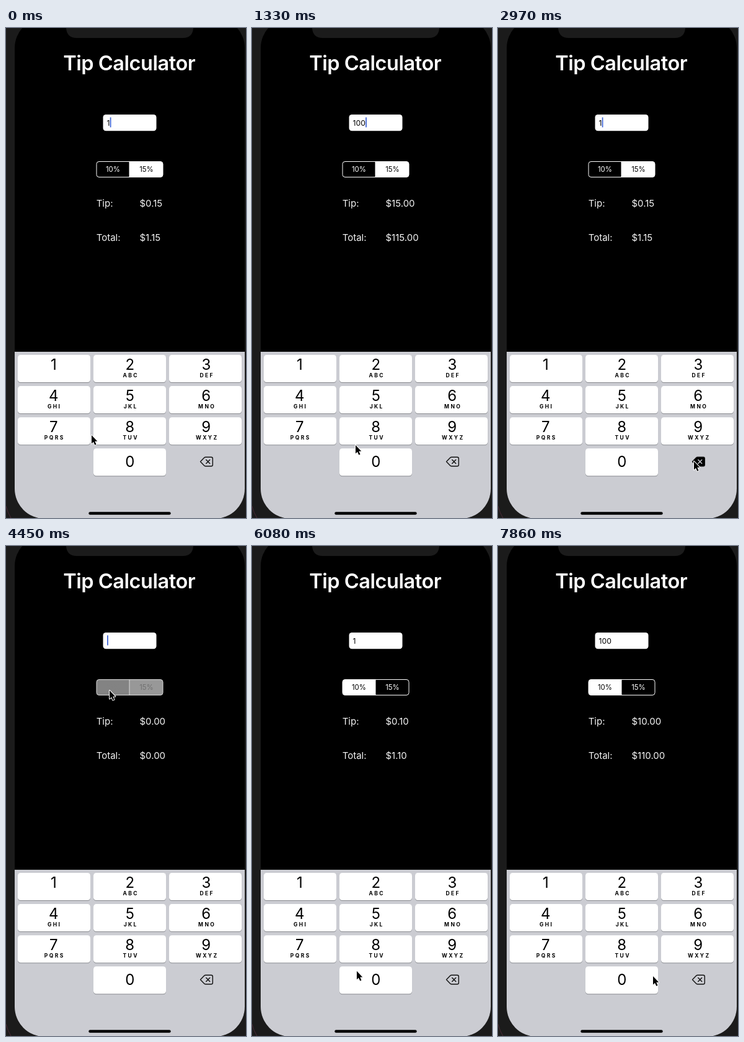
These frames come from a looping animation (387 px wide and 787 px high, 8000 ms). An HTML page:

```html
<!DOCTYPE html>
<html lang="en">
<head>
<meta charset="utf-8">
<title>Tip Calculator</title>
<style>
  html, body { margin: 0; width: 100%; height: 100%; overflow: hidden; background: #1b1b1b; }
  svg { display: block; width: 100vw; height: 100vh; font-family: Inter, Roboto, sans-serif; }
  .title { font-size: 32.5px; font-weight: 600; letter-spacing: -.45px; }
  .label { font-size: 15px; fill: #f4f4f4; }
  .field { font-size: 12.2px; }
  .segment { font-size: 11.4px; }
  .digit { font-size: 24px; }
  .letters { font-size: 8.5px; font-weight: 700; letter-spacing: 2.4px; }
  .mid { text-anchor: middle; }
</style>
</head>
<body>
<svg viewBox="0 0 387 787">
  <defs>
    <clipPath id="screen"><rect x="14" y="-16" width="371" height="804" rx="48"/></clipPath>
  </defs>
  <rect width="387" height="787" fill="#1b1b1b"/>
  <path d="M0 768Q3 779 8 787" fill="none" stroke="#4a2836"/>
  <g clip-path="url(#screen)">
    <rect x="14" width="371" height="790"/>
    <path d="M97 0Q98 16 114 16H285Q301 16 302 0Z" fill="#1b1b1b"/>
    <rect x="14" y="520" width="371" height="270" fill="#cbccd2"/>
    <rect x="133.3" y="777.2" width="132.400" height="4.600" rx="2.300"/>
  </g>

  <text class="title mid" x="198.700" y="68" fill="#fff">Tip Calculator</text>

  <rect x="156.500" y="139" width="86" height="26.300" rx="4.500" fill="#fff"/>
  <text id="bill" class="field" x="162.500" y="156.500"></text>
  <rect id="caret" y="143.500" width="1.800" height="16" fill="#4268d6"/>

  <path id="left" d="M199 214.500H150a4 4 0 0 0-4 4V235.500a4 4 0 0 0 4 4H199Z"/>
  <path id="right" d="M199 214.500H249a4 4 0 0 1 4 4V235.500a4 4 0 0 1-4 4H199Z"/>
  <path id="frame" d="M199 214.500V239.500M150 214.500H249a4 4 0 0 1 4 4V235.500a4 4 0 0 1-4 4H150a4 4 0 0 1-4-4V218.500a4 4 0 0 1 4-4Z" fill="none"/>
  <text id="leftText" class="segment mid" x="172.500" y="231">10%</text>
  <text id="rightText" class="segment mid" x="226.500" y="231">15%</text>

  <text class="label" x="145.700" y="286.500">Tip:</text>
  <text id="tip" class="label" x="215.500" y="286.500"></text>
  <text class="label" x="145.700" y="341.500">Total:</text>
  <text id="total" class="label" x="215.500" y="341.500"></text>

  <g id="keys"></g>
  <g stroke="#111" stroke-width="1.400" stroke-linejoin="round" stroke-linecap="round">
    <path id="erase" d="M313.500 696.500L319.500 690.200Q320.500 689.200 322 689.200H331Q333.300 689.200 333.300 691.500V701.500Q333.300 703.800 331 703.800H322Q320.500 703.800 319.500 702.800Z"/>
    <path id="cross" d="M322.700 693.500L328.700 699.500M328.700 693.500L322.700 699.500" fill="none"/>
  </g>

  <path id="cursor" d="M1 1V14.500L4 11.700L6.300 16.700L8.500 15.700L6.300 10.800H10.300Z"
        stroke="#fff" stroke-width="2" stroke-linejoin="round" paint-order="stroke"/>
</svg>
<script>
const LOOP = 8000, STEP = 148.3, LEAD = 8.5, LAST = 53;
const $ = id => document.getElementById(id);
const set = (id, attrs) => {
  for (const name in attrs) $(id).setAttribute(name, attrs[name]);
};

// Lists below are keyed by animation step.
const typed = [[0, '1'], [3, '10'], [6, '100'], [16, '10'], [19, '1'], [22, ''], [36, '1'], [43, '10'], [47, '100']];
const presses = [['0', 3, 4], ['0', 6, 7], ['erase', 16, 18], ['erase', 19, 21], ['erase', 22, 23],
  ['1', 36, 38], ['0', 43, 45], ['0', 47, 48]];
const path = [[0, 137, 653], [3, 160, 692], [6, 162, 698], [7, 163, 700], [9, 166, 669], [11, 295, 697],
  [12, 295, 697], [13, 315, 698], [16, 315, 698], [20, 315, 695], [23, 314, 690], [29, 166, 231],
  [31, 166, 231], [35, 84, 545], [37, 84, 545], [39, 145, 658], [42, 176, 690], [45, 179, 684],
  [50, 179, 684], [53, 249, 690]];
const SWITCH = 30;

const letters = ['', 'ABC', 'DEF', 'GHI', 'JKL', 'MNO', 'PQRS', 'TUV', 'WXYZ'];
const keyMarkup = (digit, col, row, sub) => {
  const x = 19 + col * 122, y = 525 + row * 50.1, mid = 76.8 + col * 123;
  const baseline = y + (digit ? 24 : 30);
  return `<rect x="${x}" y="${y + 1}" width="117" height="44" rx="4.5" fill="#898b90"/>
    <rect id="key${digit}" x="${x}" y="${y}" width="117" height="44" rx="4.5"/>
    <text class="digit mid" x="${mid}" y="${baseline}">${digit}</text>
    <text class="letters mid" x="${mid + 1.4}" y="${y + 36}">${sub}</text>`;
};
$('keys').innerHTML = letters.map((sub, i) => keyMarkup(i + 1, i % 3, Math.floor(i / 3), sub)).join('')
  + keyMarkup(0, 1, 3, '');

function cursorAt(step) {
  const i = Math.max(1, path.findIndex(p => p[0] >= step));
  const [s0, x0, y0] = path[i - 1], [s1, x1, y1] = path[i];
  const u = (step - s0) / (s1 - s0), e = u * u * (3 - 2 * u);
  return [x0 + (x1 - x0) * e, y0 + (y1 - y0) * e];
}

function paintSegments(step) {
  const fading = step === SWITCH, tenOn = step > SWITCH;
  const shade = on => on ? '#fff' : '#000';
  set('left', { fill: fading ? '#838383' : shade(tenOn) });
  set('right', { fill: fading ? '#989898' : shade(!tenOn) });
  set('leftText', { fill: fading ? '#838383' : shade(!tenOn) });
  set('rightText', { fill: fading ? '#707070' : shade(tenOn) });
  set('frame', { stroke: fading ? '#d8d8d8' : '#fff' });
}

function draw(step) {
  const [since, text] = typed.filter(e => e[0] <= step).pop();
  const rate = step >= SWITCH ? .10 : .15, bill = Number(text);
  $('bill').textContent = text;
  $('tip').textContent = '$' + (bill * rate).toFixed(2);
  $('total').textContent = '$' + (bill * (1 + rate)).toFixed(2);
  set('caret', {
    x: 163 + (text ? 4.7 + 7.7 * (text.length - 1) : 0),
    opacity: (step - since) % 7 < 5 ? 1 : 0
  });
  paintSegments(step);

  const press = presses.find(p => step >= p[1] && step < p[2]);
  const held = press && press[0];
  for (let digit = 0; digit < 10; digit++)
    set('key' + digit, { fill: held === String(digit) ? '#adb8c8' : '#fff' });
  set('erase', { fill: held === 'erase' ? '#000' : 'none' });
  set('cross', { stroke: held === 'erase' ? '#cbccd2' : '#111' });
  set('cursor', { transform: `translate(${cursorAt(step)})` });
}

function tick() {
  const time = performance.now() % LOOP;
  draw(Math.min(LAST, Math.floor((time + LEAD) / STEP)));
  requestAnimationFrame(tick);
}
tick();
</script>
</body>
</html>
```
